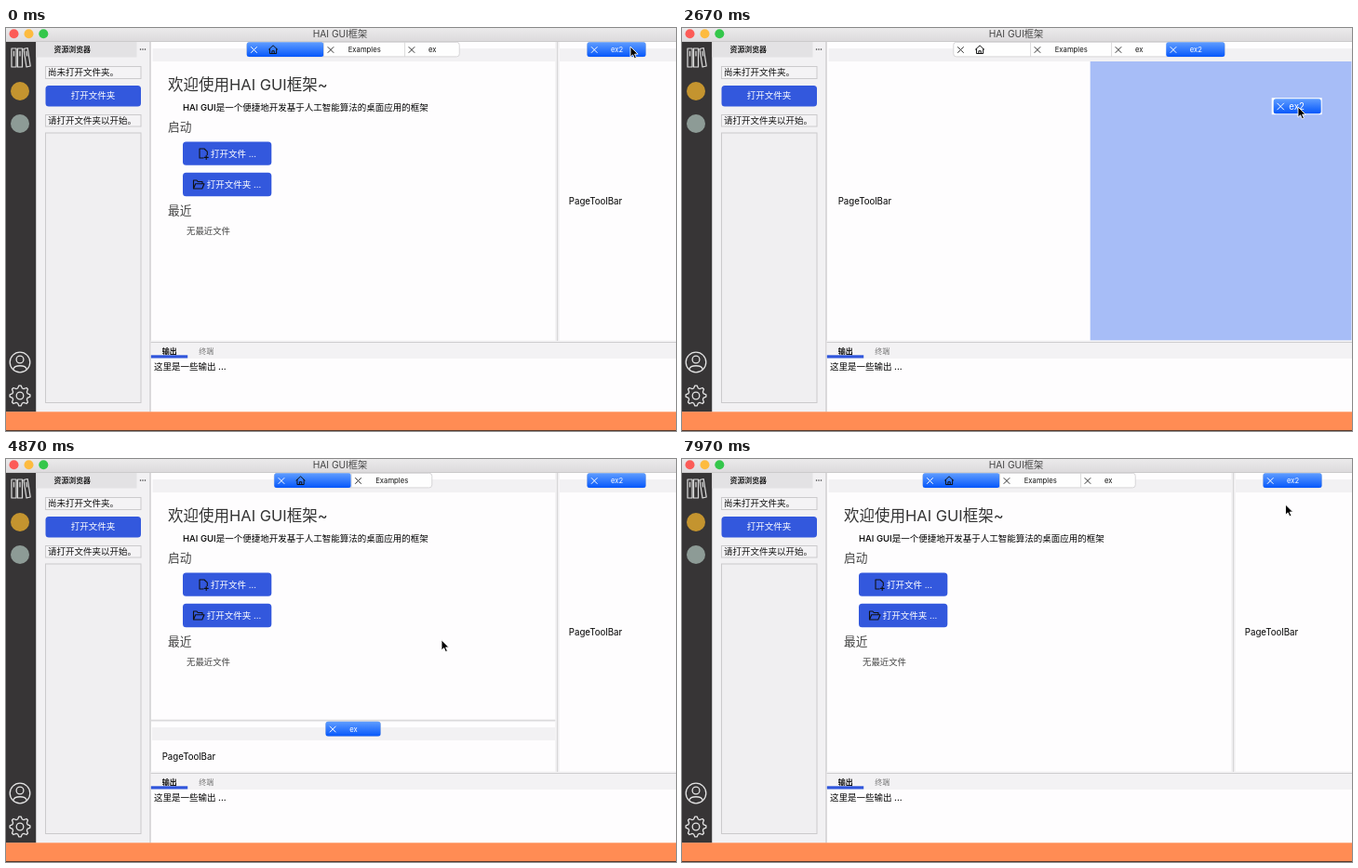
An HTML page for the animation above (8000 ms loop, 720 by 434 pixels).

```html
<!DOCTYPE html>
<html lang="zh">
<head>
<meta charset="utf-8">
<title>HAI GUI</title>
<style>
  html, body { margin: 0; width: 100%; height: 100%; overflow: hidden; background: #fff; }
  svg { display: block; width: 720px; height: 434px; }
  text { font-family: Inter, "Noto Sans CJK SC", "Noto Sans CJK", sans-serif; white-space: pre; }
  .line { fill: none; stroke-linecap: round; stroke-linejoin: round; }
</style>
</head>
<body>
<svg id="stage" viewBox="0 0 720 434">
  <defs>
    <linearGradient id="blue" x2="0" y2="1">
      <stop offset="0" stop-color="#5f9dff"/><stop offset="1" stop-color="#0657fb"/>
    </linearGradient>
    <linearGradient id="bar" x2="0" y2="1">
      <stop offset="0" stop-color="#ebeaeb"/><stop offset="1" stop-color="#dcdadc"/>
    </linearGradient>
  </defs>
</svg>
<script>
const PERIOD = 8000;
const stage = document.getElementById('stage');

const rect = (x, y, w, h, fill, extra = '') =>
  `<rect x="${x}" y="${y}" width="${w}" height="${h}" fill="${fill}" ${extra}/>`;
const text = (x, y, size, str, fill = '#111', extra = '') =>
  `<text x="${x}" y="${y}" font-size="${size}" fill="${fill}" ${extra}>${str}</text>`;
const line = (d, color, width = 1) =>
  `<path class="line" d="${d}" stroke="${color}" stroke-width="${width}"/>`;
const circle = (x, y, r, fill, extra = '') =>
  `<circle cx="${x}" cy="${y}" r="${r}" fill="${fill}" ${extra}/>`;
const cross = (x, y, color, r = 3) =>
  line(`M${x - r} ${y - r}l${2 * r} ${2 * r}m0 ${-2 * r}l${-2 * r} ${2 * r}`, color, 1);
const box = (y, h, fill) => rect(42.5, y, 102.5, h, fill, 'stroke="#cbcacc" stroke-width="1"');
const button = (x, y, w, h) => rect(x, y, w, h, '#3358dd', 'rx="3.5"');

function gear(cx, cy) {
  const points = [];
  for (let i = 0; i < 32; i++) {
    const r = i % 4 < 2 ? 11 : 8.4, a = (i - 0.5) * Math.PI / 16;
    points.push(`${(cx + r * Math.cos(a)).toFixed(1)} ${(cy + r * Math.sin(a)).toFixed(1)}`);
  }
  return line(`M${points.join('L')}Z`, '#e4e4e4', 1.3) +
    circle(cx, cy, 3.8, 'none', 'stroke="#e4e4e4" stroke-width="1.3"');
}

function frame() {
  return rect(0, 0, 720, 434, '#fefdfe') +
    rect(0, 0, 720, 14.5, 'url(#bar)') + rect(0, 14, 720, 0.8, '#c4c2c4') +
    circle(8.5, 6.3, 5, '#fc5b57') + circle(24.5, 6.3, 5, '#fdbb3f') + circle(40.3, 6.3, 5, '#34c74b') +
    text(359, 10, 10.2, 'HAI GUI框架', '#444', 'text-anchor="middle"') +
    // activity bar
    rect(0, 15, 32.5, 398.5, '#373536') +
    line('M6 22h5v20h-5zM12.5 22h5v20h-5zM19 22.5l4.2-1 3 19.5-4.2 1zM8.5 25v5M15 25v5M21.8 25l.8 5', '#dedede', 1.2) +
    circle(15, 68, 10, '#c4942f') + circle(15, 103, 10, '#8d9b96') +
    circle(15, 360, 10.8, 'none', 'stroke="#e4e4e4" stroke-width="1.3"') +
    circle(15, 357, 3.9, 'none', 'stroke="#e4e4e4" stroke-width="1.3"') +
    line('M7.8 367.5C9 362.5 21 362.5 22.2 367.5', '#e4e4e4', 1.3) + gear(15, 396) +
    // explorer
    rect(32.5, 15, 122, 398.5, '#f2f1f3') + rect(32.5, 15, 108, 16.5, '#e3e2e4') +
    text(51.5, 26.3, 7.9, '资源浏览器', '#222', 'font-weight="600"') +
    [144.5, 147, 149.5].map(x => circle(x, 23, 0.75, '#333')).join('') +
    box(41.5, 13, '#f4f3f5') + text(45, 51.4, 9.5, '尚未打开文件夹。') +
    button(42.5, 62, 102.5, 22.5) + text(69.8, 76.4, 9.5, '打开文件夹', '#fff') +
    box(93.5, 12.5, '#f4f3f5') + text(45, 103, 9.5, '请打开文件夹以开始。') +
    box(113, 290.5, '#f0eff1') + rect(154.5, 15, 1, 398.5, '#b9b8ba') +
    // output
    rect(155.5, 336.5, 565, 19.5, '#f3f2f4') + rect(155.5, 338, 565, 1, '#cfced0') +
    text(167.8, 350.5, 8, '输出', '#111', 'font-weight="600"') + text(207.3, 350.5, 8, '终端', '#777') +
    rect(155.8, 352.3, 39.4, 3.2, '#3056dc') +
    text(159, 368, 9.5, '这里是一些输出 ...', '#000', 'font-weight="500"') +
    rect(0, 413.3, 720, 20, '#ff8c54') + rect(0, 433, 720, 1, '#5b3a2b');
}

const TAB_WIDTH = { home: 82.5, Examples: 87, ex: 59, ex2: 63 };
const homeIcon = (x, y) => line(`M${x - 4.6} ${y}l4.6-4.3 4.6 4.3M${x - 3.6} ${y - 0.6}v5h7.2v-5M${x - 1.2} ${y + 4.4}v-2.8h2.4v2.8`, '#111', 1);

function tabs(names, active, center, y) {
  const total = names.reduce((sum, n) => sum + TAB_WIDTH[n], 0);
  const start = center - total / 2;
  let x = start;
  let out = rect(start, y, total, 15.6, '#fefefe', 'rx="3" stroke="#d3d2d4" stroke-width=".9"');
  names.forEach((name, i) => {
    const w = TAB_WIDTH[name], on = name === active;
    if (on) out += rect(x, y, w, 15.8, 'url(#blue)', 'rx="2.5"');
    else if (i) out += rect(x, y, 0.8, 15.6, '#d3d2d4');
    out += cross(x + 7.7, y + 8.2, on ? '#fff' : '#333');
    out += name === 'home' ? homeIcon(x + 28.3, y + 7.8)
      : text(x + w / 2 + 0.5, y + 10.8, 7.7, name, on ? '#fff' : '#111', 'text-anchor="middle"');
    x += w;
  });
  return out;
}

const strip = (x, w, y) => rect(x, y + 7, w, 14, '#f2f1f3');
const toolBar = (x, y) => text(x, y, 9.7, 'PageToolBar', '#000');

function welcome(dx) {
  const fileX = 207 + dx, dirX = 201.5 + dx;
  return text(174, 67, 16.5, '欢迎使用HAI GUI框架~', '#333') +
    text(190 + dx, 88.5, 9.5, 'HAI GUI是一个便捷地开发基于人工智能算法的桌面应用的框架', '#000', 'font-weight="500"') +
    text(174, 111, 12.7, '启动', '#444') +
    button(190 + dx, 122.5, 95.3, 25.3) + button(190 + dx, 155.7, 95.3, 25.5) +
    line(`M${fileX + 5} 140h-4v-10h5l3.3 3.2v3.3M${fileX + 6.2} 139.4h4m-2-2v4`, '#111', 1.1) +
    text(220 + dx, 138.6, 9.5, '打开文件 ...', '#fff') +
    line(`M${dirX} 173v-9h3.5l1.2 1.5h4.8v2M${dirX} 173l2.2-5.3h9.3l-2.2 5.3z`, '#111', 1.1) +
    text(215.8 + dx, 171.8, 9.5, '打开文件夹 ...', '#fff') +
    text(174, 201, 12.7, '最近', '#444') + text(194 + dx, 221.6, 9.4, '无最近文件', '#444');
}

const rightPane = () => rect(590.3, 15, 4.2, 322, '#efeef0') + rect(592, 15, 0.8, 322, '#d2d1d3') +
  strip(595, 125, 15) + tabs(['ex2'], 'ex2', 656, 15.3) + toolBar(604.8, 190);
const bottomPane = () => rect(156, 280.3, 434.3, 2.8, '#efeef0') + rect(156, 281.3, 434.3, 0.8, '#d2d1d3') +
  strip(157, 433, 282) + tabs(['ex'], 'ex', 373, 282.8) + toolBar(167.7, 323.6);

const ALL = ['home', 'Examples', 'ex', 'ex2'];
const scenes = {
  split: strip(157.5, 433, 15) + tabs(ALL.slice(0, 3), 'home', 373, 15.3) + welcome(0) + rightPane(),
  splitEx: strip(157.5, 433, 15) + tabs(ALL.slice(0, 3), 'ex', 373, 15.3) + toolBar(167.7, 190) + rightPane(),
  single: strip(157.5, 563, 15) + tabs(ALL, 'home', 437.5, 15.3) + welcome(6.5),
  singleEx2: strip(157.5, 563, 15) + tabs(ALL, 'ex2', 437.5, 15.3) + toolBar(167.7, 190),
  triple: strip(157.5, 433, 15) + tabs(ALL.slice(0, 2), 'home', 373, 15.3) + welcome(0) + rightPane() + bottomPane()
};

const TINT = 'rgba(52,106,237,.43)';
const ghost = (name, w) => rect(-w / 2, -9, w, 18, '#fff') +
  rect(-w / 2 + 2, -8, w - 3, 16, 'url(#blue)', 'rx="2.5"') +
  cross(-w / 2 + 9.5, 0.3, '#fff', 3.4) + text(-w / 2 + 18.5, 3.8, 9.7, name, '#fff');

const layers = {
  ...scenes,
  dropRight: rect(438.7, 36, 280.8, 300.3, TINT),
  dropLeft: rect(158, 36, 432, 300.3, TINT),
  dropBottom: rect(158, 186, 432, 150.3, TINT),
  dropTop: rect(158, 36, 432, 244, TINT),
  ex: ghost('ex', 48),
  ex2: ghost('ex2', 54),
  cursor: '<path d="M0 0v11.2l2.6-2.4 1.8 4 2-.9-1.8-3.8h3.5z" fill="#000" stroke="#fff" stroke-width=".9"/>'
};
stage.insertAdjacentHTML('beforeend', frame() +
  Object.entries(layers).map(([id, body]) => `<g id="${id}">${body}</g>`).join(''));
const nodes = Object.fromEntries(Object.keys(layers).map(id => [id, document.getElementById(id)]));

// [start, end, layer]
const schedule = [
  [0, 700, 'split'], [700, 2050, 'single'], [2050, 2950, 'singleEx2'], [2950, 3750, 'split'],
  [3750, 4520, 'splitEx'], [4520, 7600, 'triple'], [7600, 8000, 'split'],
  [2400, 2950, 'dropRight'], [3980, 4300, 'dropLeft'], [4300, 4520, 'dropBottom'], [7160, 7500, 'dropTop'],
  [150, 700, 'ex2'], [2180, 2950, 'ex2'], [3880, 4520, 'ex'], [7080, 7600, 'ex']
];

// [time, x, y]
const path = [
  [0, 671, 20], [150, 671, 20], [660, 505, 23], [760, 505, 23], [1250, 600, 90], [1770, 554, 39],
  [2000, 553, 22], [2150, 553, 22], [2670, 662, 85], [2760, 662, 85], [2900, 672, 105], [3050, 672, 105],
  [3650, 459, 21], [3850, 459, 21], [4230, 448, 268], [4420, 446, 312], [4550, 446, 312],
  [4870, 468, 195], [5300, 474, 186], [5800, 440, 230], [6300, 436, 222], [6850, 380, 287], [7050, 380, 287],
  [7570, 478, 22], [7650, 478, 22], [7970, 648, 49], [8000, 651, 45]
];

// Hermite curve through the points, at rest wherever the pointer pauses
function slope(i, k) {
  const prev = path[i - 1], here = path[i], next = path[i + 1];
  if (!prev || !next) return 0;
  const paused = [prev, next].some(p => p[1] === here[1] && p[2] === here[2]);
  return paused ? 0 : (next[k] - prev[k]) / (next[0] - prev[0]);
}
function pointer(t) {
  const i = Math.max(0, path.findIndex(p => p[0] > t) - 1);
  const a = path[i], b = path[i + 1], d = b[0] - a[0];
  const u = Math.max(0, (t - a[0]) / d), v = 1 - u;
  return [1, 2].map(k => a[k] * v * v * (1 + 2 * u) + b[k] * u * u * (3 - 2 * u) +
    d * u * v * (v * slope(i, k) - u * slope(i + 1, k)));
}
const place = (node, [x, y]) =>
  node.setAttribute('transform', `translate(${x.toFixed(1)} ${y.toFixed(1)})`);

const origin = performance.now();
function draw() {
  const t = (performance.now() - origin) % PERIOD;
  const visible = new Set(schedule.filter(([from, to]) => t >= from && t < to).map(s => s[2]));
  for (const id in nodes) nodes[id].style.display = id === 'cursor' || visible.has(id) ? '' : 'none';
  const trailing = pointer(Math.max(0, t - 35));
  place(nodes.ex, trailing);
  place(nodes.ex2, trailing);
  place(nodes.cursor, pointer(t));
  requestAnimationFrame(draw);
}
draw();
</script>
</body>
</html>
```
